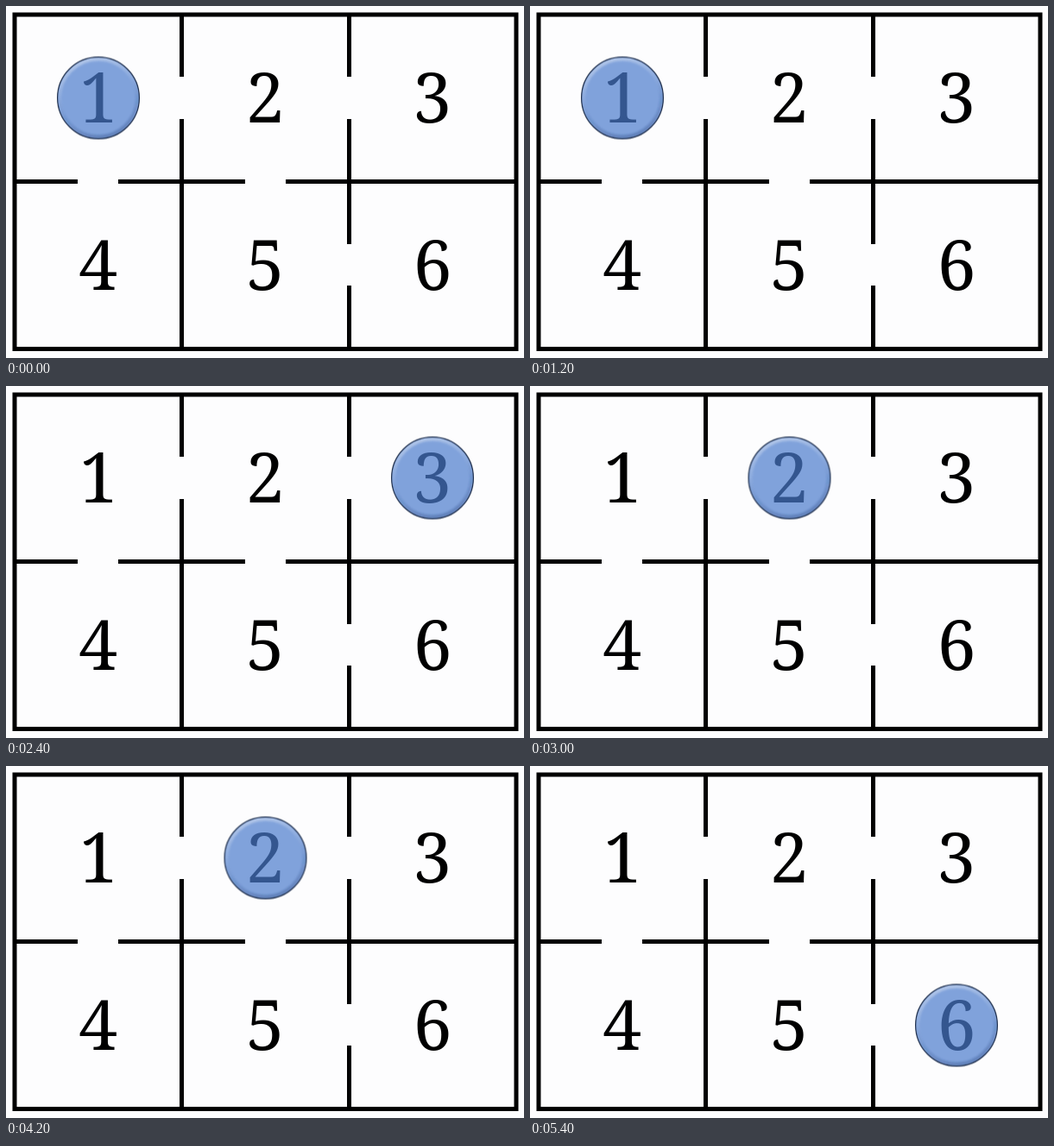
These frames come from a looping animation (600 by 408 pixels, 6000 ms). An HTML page:

```html
<!DOCTYPE html>
<html lang="en">
<head>
<meta charset="utf-8">
<title>Six rooms</title>
<style>
  html, body { margin: 0; width: 100%; height: 100%; overflow: hidden; background: #fdfdfe; }
  svg { display: block; width: 600px; height: 408px; }
  .walls { fill: none; stroke: #000; stroke-width: 5; }
  text { font: 80px "Noto Serif", serif; text-anchor: middle; }

  /* The token jumps between rooms: 1 4 1 2 3 2 5 2 5 6 */
  .token { animation: visit 6s step-end infinite; }
  @keyframes visit {
    0%, 20%, 100% { transform: translate(107px, 106.5px); }
    10% { transform: translate(106.5px, 300.5px); }
    30%, 50%, 70% { transform: translate(300.5px, 106.5px); }
    40% { transform: translate(494px, 106.5px); }
    60%, 80% { transform: translate(300.5px, 300.5px); }
    90% { transform: translate(494px, 300.5px); }
  }
</style>
</head>
<body>
<svg viewBox="0 0 600 408">
  <defs>
    <linearGradient id="bevel" x1=".35" y1="0" x2=".65" y2="1">
      <stop offset="0" stop-color="#fff" stop-opacity=".4"/>
      <stop offset=".35" stop-color="#fff" stop-opacity=".12"/>
      <stop offset=".6" stop-color="#1c3c78" stop-opacity=".1"/>
      <stop offset="1" stop-color="#1c3c78" stop-opacity=".35"/>
    </linearGradient>
    <filter id="soft"><feGaussianBlur stdDeviation=".8"/></filter>
  </defs>

  <g class="walls">
    <rect x="10" y="10" width="581" height="387.5"/>
    <path d="M203.5 10V82M203.5 131V397M397.5 10V82M397.5 131V276M397.5 324V397"/>
    <path d="M10 203.5H83M130 203.5H277M324 203.5H591"/>
  </g>

  <text x="107" y="135">1</text>
  <text x="300" y="135">2</text>
  <text x="493.5" y="135">3</text>
  <text x="106.5" y="329">4</text>
  <text x="300" y="329">5</text>
  <text x="494" y="329">6</text>

  <g class="token">
    <circle r="47.5" fill="#4a7bcc" fill-opacity=".7"/>
    <circle r="45" fill="none" stroke="url(#bevel)" stroke-width="4" filter="url(#soft)"/>
    <circle r="47.4" fill="none" stroke="#1f2f4c" stroke-width="1.2"/>
  </g>
</svg>
</body>
</html>
```
